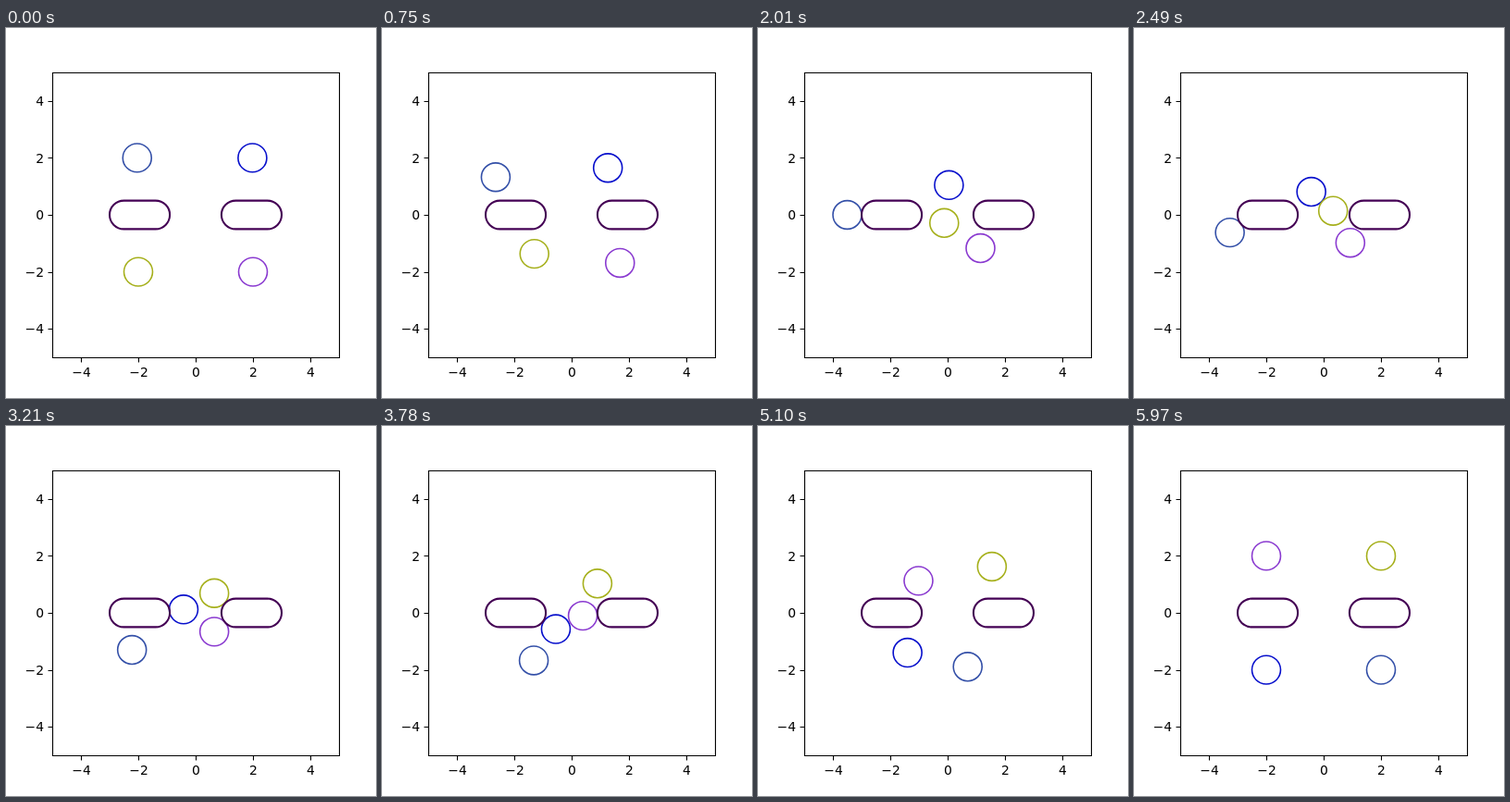
Write an HTML page that moves like this. It is 400 by 400 pixels and loops after 6 s.

```html
<!DOCTYPE html>
<html lang="en">
<head>
<meta charset="utf-8">
<title>Four discs swapping corners</title>
<style>
  html, body { margin: 0; width: 100%; height: 100%; overflow: hidden; background: #fff; }
  svg { display: block; }
  text { font: 13.89px "DejaVu Sans", sans-serif; }
</style>
</head>
<body>
<svg id="plot" width="400" height="400" viewBox="0 0 400 400" fill="none"></svg>
<script>
const plot = document.getElementById('plot');
const RX = 15.5, RY = 15.4; // half a data unit in pixels
const px = x => 205 + 2 * RX * x;
const py = y => 202 - 2 * RY * y;

function add(tag, attrs, text = '') {
  const el = document.createElementNS('http://www.w3.org/2000/svg', tag);
  for (const key in attrs) el.setAttribute(key, attrs[key]);
  el.textContent = text;
  return plot.appendChild(el);
}

// Waypoints in data units: each disc runs straight between them
// and slides around any obstacle it touches.
const times = [0, 1530, 2490, 3210, 3780, 4350, 5970];
const discs = [
  { color: '#3450a8', path: [[-2.04, 2], [-3.28, 0.62], [-3.27, -0.62], [-2.22, -1.3], [-1.32, -1.67], [-0.42, -1.8], [2, -2]] },
  { color: '#0810cc', path: [[1.98, 2], [0.52, 1.28], [-0.43, 0.81], [-0.42, 0.12], [-0.55, -0.57], [-0.88, -0.88], [-2, -2]] },
  { color: '#a6b01c', path: [[-2, -2], [-0.57, -0.71], [0.33, 0.14], [0.65, 0.69], [0.9, 1.03], [1.15, 1.3], [2, 2]] },
  { color: '#8a3ad0', path: [[2, -2], [1.36, -1.36], [0.93, -0.98], [0.65, -0.66], [0.39, -0.1], [-0.17, 0.37], [-2, 2]] }
];
for (const disc of discs) {
  disc.el = add('ellipse', { rx: RX, ry: RY, stroke: disc.color, 'stroke-width': 1.6 });
}

// Obstacles: everything within half a unit of a horizontal segment
const walls = [[-2.5, -1.4], [1.4, 2.5]];
for (const [a, b] of walls) {
  add('rect', { x: px(a) - RX, y: py(0) - RY, width: px(b) - px(a) + 2 * RX, height: 2 * RY,
    rx: RX, ry: RY, stroke: '#440154', 'stroke-width': 2.08 });
}

// Axes
const snap = v => Math.floor(v + 0.5) + 0.5;
const line = d => add('path', { d, stroke: '#000', 'stroke-width': 1.11 });
line('M50.5 48.5H360.5V356.5H50.5Z');
for (const v of [-4, -2, 0, 2, 4]) {
  const x = snap(px(v)), y = snap(py(v));
  const label = String(v).replace('-', '\u2212');
  line(`M${x} 356.5v5M50.5 ${y}h-5`);
  add('text', { x, y: 377, fill: '#000', 'text-anchor': 'middle' }, label);
  add('text', { x: 41, y: Math.round(py(v) + 5.2), fill: '#000', 'text-anchor': 'end' }, label);
}

function position(path, t) {
  const i = Math.max(1, times.findIndex(end => t <= end));
  const s = (t - times[i - 1]) / (times[i] - times[i - 1]);
  let [x, y] = path[i - 1].map((v, k) => v + s * (path[i][k] - v));
  for (const [a, b] of walls) {
    const near = Math.min(b, Math.max(a, x));
    const gap = Math.hypot(x - near, y);
    if (gap < 0.98) {
      x = near + (x - near) / gap;
      y /= gap;
    }
  }
  return [x, y];
}

function draw() {
  const t = Math.floor(performance.now() % 6000 / 30) * 30;
  for (const disc of discs) {
    const [x, y] = position(disc.path, t);
    disc.el.setAttribute('cx', px(x));
    disc.el.setAttribute('cy', py(y));
  }
  requestAnimationFrame(draw);
}
draw();
</script>
</body>
</html>
```
